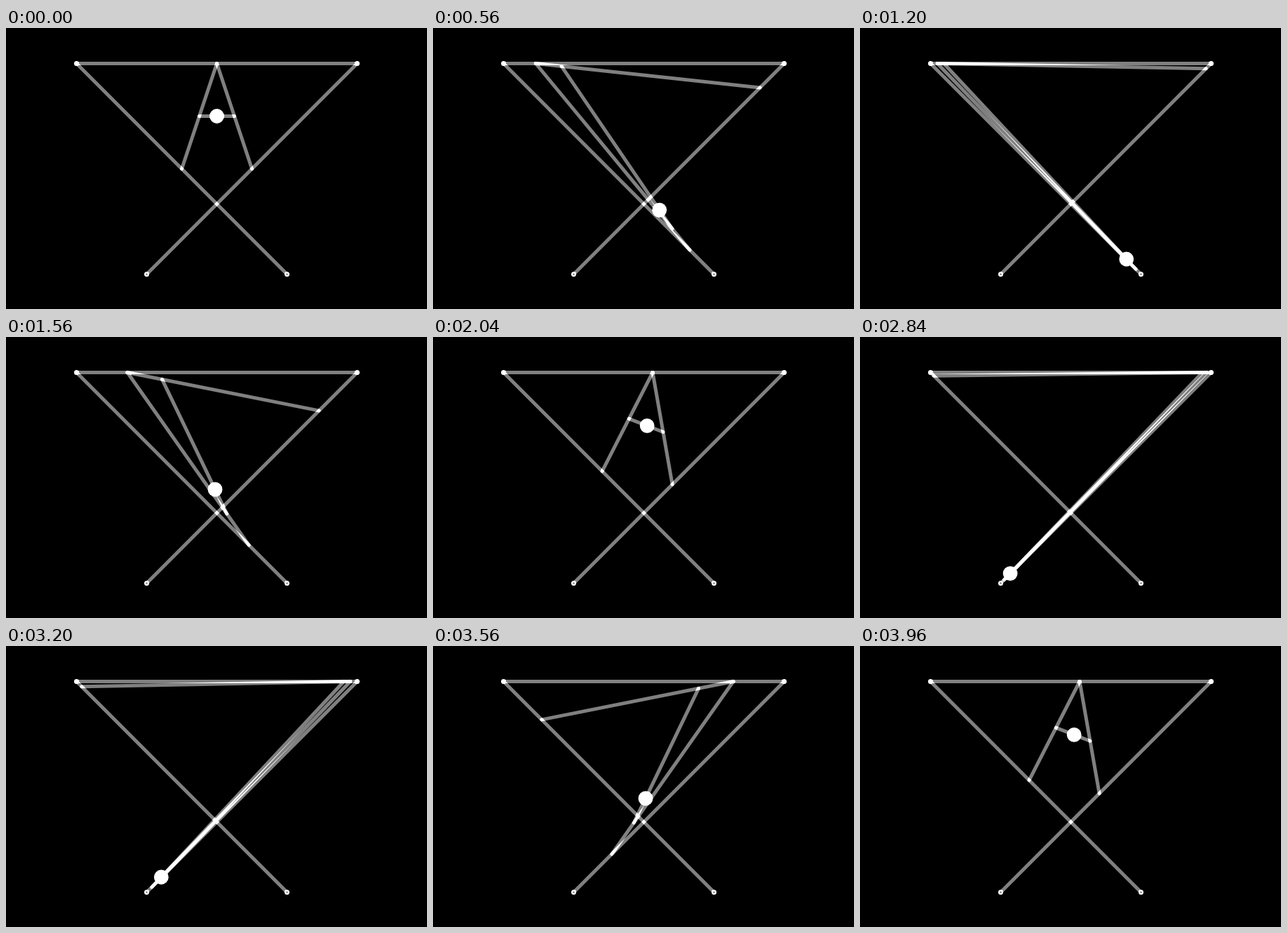
An HTML page with a canvas that plays this animation: 600x400 px, repeating every 4 s.

```html
<!DOCTYPE html>
<html lang="en">
<head>
<meta charset="utf-8">
<title>Cubic curve construction</title>
<style>
  html, body { margin: 0; width: 100%; height: 100%; overflow: hidden; background: #000; }
  canvas { display: block; }
</style>
</head>
<body>
<canvas id="stage" width="600" height="400"></canvas>
<script>
const ctx = document.getElementById('stage').getContext('2d');
const LOOP = 4000;
const STEP = 40;
const CONTROLS = [[400, 350], [100, 50], [500, 50], [200, 350]];

const mix = (a, b, t) => a.map((v, i) => v + (b[i] - v) * t);

function line(a, b) {
  ctx.beginPath();
  ctx.moveTo(...a);
  ctx.lineTo(...b);
  ctx.stroke();
}

function circle([x, y], r) {
  ctx.beginPath();
  ctx.arc(x, y, r, 0, Math.PI * 2);
}

function draw(ms) {
  const t = 0.5 - 0.5 * Math.sin(ms / LOOP * Math.PI * 2);

  ctx.setTransform(1, 0, 0, 1, 0, 0);
  ctx.globalCompositeOperation = 'source-over';
  ctx.fillStyle = '#000';
  ctx.fillRect(0, 0, 600, 400);

  // Lines add up to white where they cross; integers sit on pixel centres.
  ctx.translate(0.5, 0.5);
  ctx.globalCompositeOperation = 'lighter';
  ctx.lineCap = 'round';
  ctx.lineWidth = 5;
  ctx.strokeStyle = 'rgba(255, 255, 255, 0.5)';

  let points = CONTROLS;
  while (points.length > 1) {
    const next = [];
    for (let i = 1; i < points.length; i++) {
      line(points[i - 1], points[i]);
      next.push(mix(points[i - 1], points[i], t));
    }
    points = next;
  }

  ctx.lineWidth = 2;
  ctx.strokeStyle = ctx.fillStyle = '#fff';
  for (const p of CONTROLS) {
    circle(p, 2.5);
    ctx.stroke();
  }
  circle(points[0], 10.4);
  ctx.fill();
}

const start = performance.now();

function tick() {
  const ms = Math.max(0, performance.now() - start) % LOOP;
  draw(Math.floor(ms / STEP) * STEP);
  requestAnimationFrame(tick);
}
tick();
</script>
</body>
</html>
```
